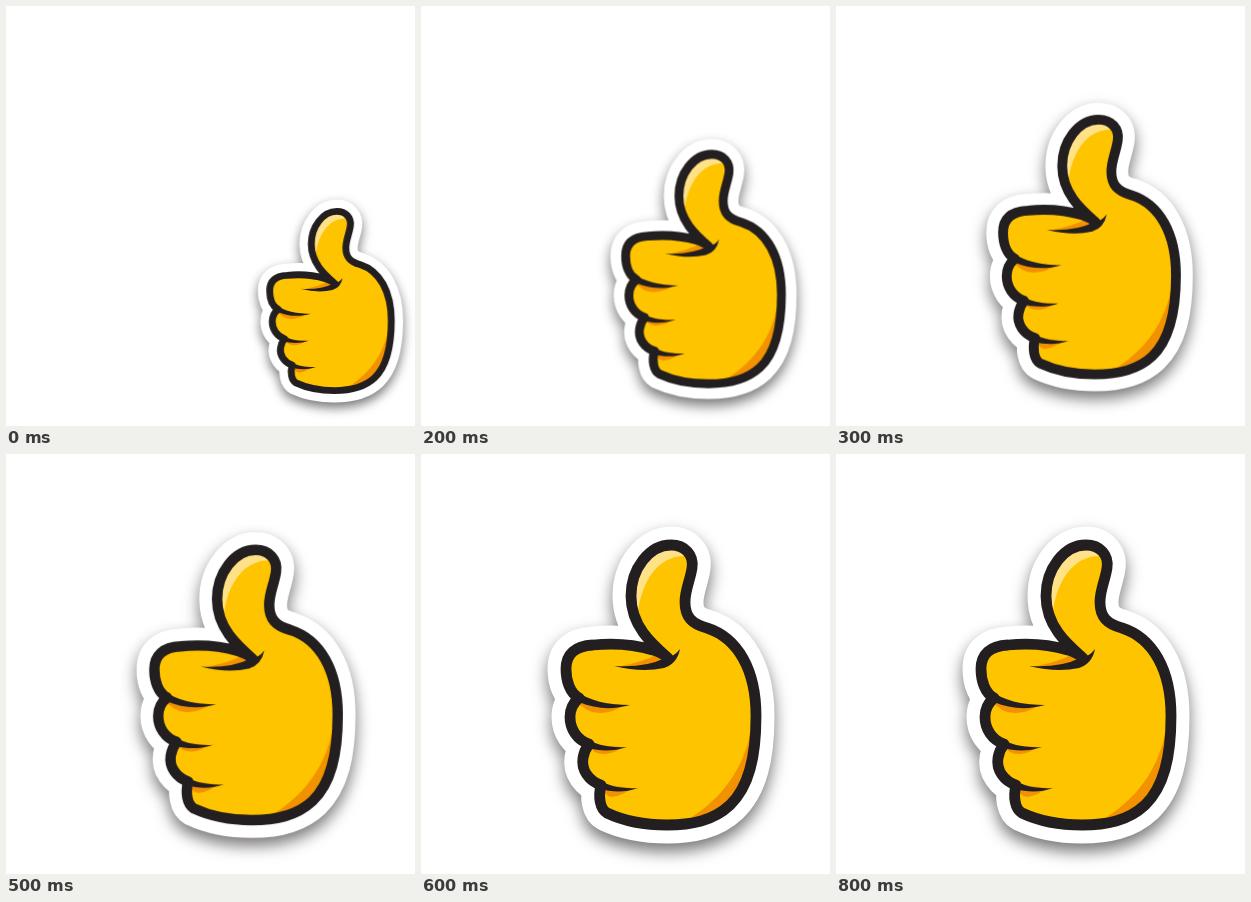
An HTML page without scripts that plays this animation: 409 px wide and 420 px high, repeating every 1.4 s.

```html
<!DOCTYPE html>
<html lang="en">
<head>
<meta charset="utf-8">
<title>Thumbs up</title>
<style>
  html, body { margin: 0; width: 100%; height: 100%; overflow: hidden; background: #fff; }
  svg { display: block; width: 100%; height: 100%; }
  .sticker {
    transform-origin: 240px 231px;
    animation: pop 1400ms step-end infinite;
  }
  .border { fill: #fff; stroke: #fff; stroke-width: 37; }
  .skin { fill: #ffc400; }
  .shade { fill: #f39200; }
  .shine { fill: #ffe188; }
  .outline { fill: none; stroke: #231f20; stroke-width: 10.8; }
  .crease { fill: #231f20; }
  /* Glide in while growing, then pulse twice. */
  @keyframes pop {
    0% { transform: translate(84.5px, 64px) scale(.64); }
    7.14% { transform: translate(71px, 54px) scale(.73); }
    14.28% { transform: translate(42.5px, 32px) scale(.82); }
    21.42% { transform: translate(13.5px, 10px) scale(.91); }
    28.57%, 42.85%, 57.14%, 100% { transform: none; }
    35.71%, 50% { transform: scale(.965); }
  }
</style>
</head>
<body>
<svg viewBox="0 0 409 420" stroke-linejoin="round">
  <defs>
    <filter id="shadow" filterUnits="userSpaceOnUse" x="80" y="30" width="320" height="430" color-interpolation-filters="sRGB">
      <feDropShadow dx="0" dy="8" stdDeviation="8" flood-color="#231f20" flood-opacity=".62"/>
    </filter>
    <path id="hand" d="M247 204 C231 190 210 172 210 142 C210 115 228 91 250 91
      C264 91 273 101 271 114 C269 127 264 136 264 148 C264 163 271 170 286 174
      C317 184 335 216 335 262 C335 303 328 333 309 351 C292 367 270 371 246 371
      C225 371 203 367 186 359 C179 355 177 343 180 331 C168 327 160 316 162 304
      C163 298 165 294 168 290 C156 286 149 275 149 263 C149 255 152 249 158 244
      C149 239 145 227 145 215 C145 200 154 192 172 191 C192 189 212 190 232 196
      C238 198 244 201 247 204Z"/>
  </defs>
  <g class="sticker">
    <use href="#hand" class="border" filter="url(#shadow)"/>
    <use href="#hand" class="skin"/>
    <g class="shade">
      <path d="M333 256 C328 310 304 342 268 365 Q290 365 307 350 Q333 325 333 256Z"/>
      <path d="M200 212 Q222 208 237 200 L248 206 L235 214Z"/>
      <path d="M155 246 Q166 260 180 259 Q194 258 203 251Z"/>
      <path d="M166 290 Q173 301 184 300 Q195 299 201 293Z"/>
      <path d="M179 330 Q182 342 191 343 Q203 341 211 334Z"/>
    </g>
    <path class="shine" d="M217 158 C210 128 224 97 250 95 Q261 96 265 102 C238 101 221 126 217 158Z"/>
    <use href="#hand" class="outline"/>
    <g class="crease">
      <path d="M193 212 Q224 214 244 204 Q253 203 259 195 Q256 210 243 214 Q221 219 193 212Z"/>
      <path d="M154 236 C167 247 188 251 209 251 C192 256 174 255 158 248Z"/>
      <path d="M163 283 C174 291 188 294 206 293 C192 298 178 297 167 294Z"/>
      <path d="M176 325 C187 332 200 335 217 334 C204 339 190 338 179 335Z"/>
    </g>
  </g>
</svg>
</body>
</html>
```
